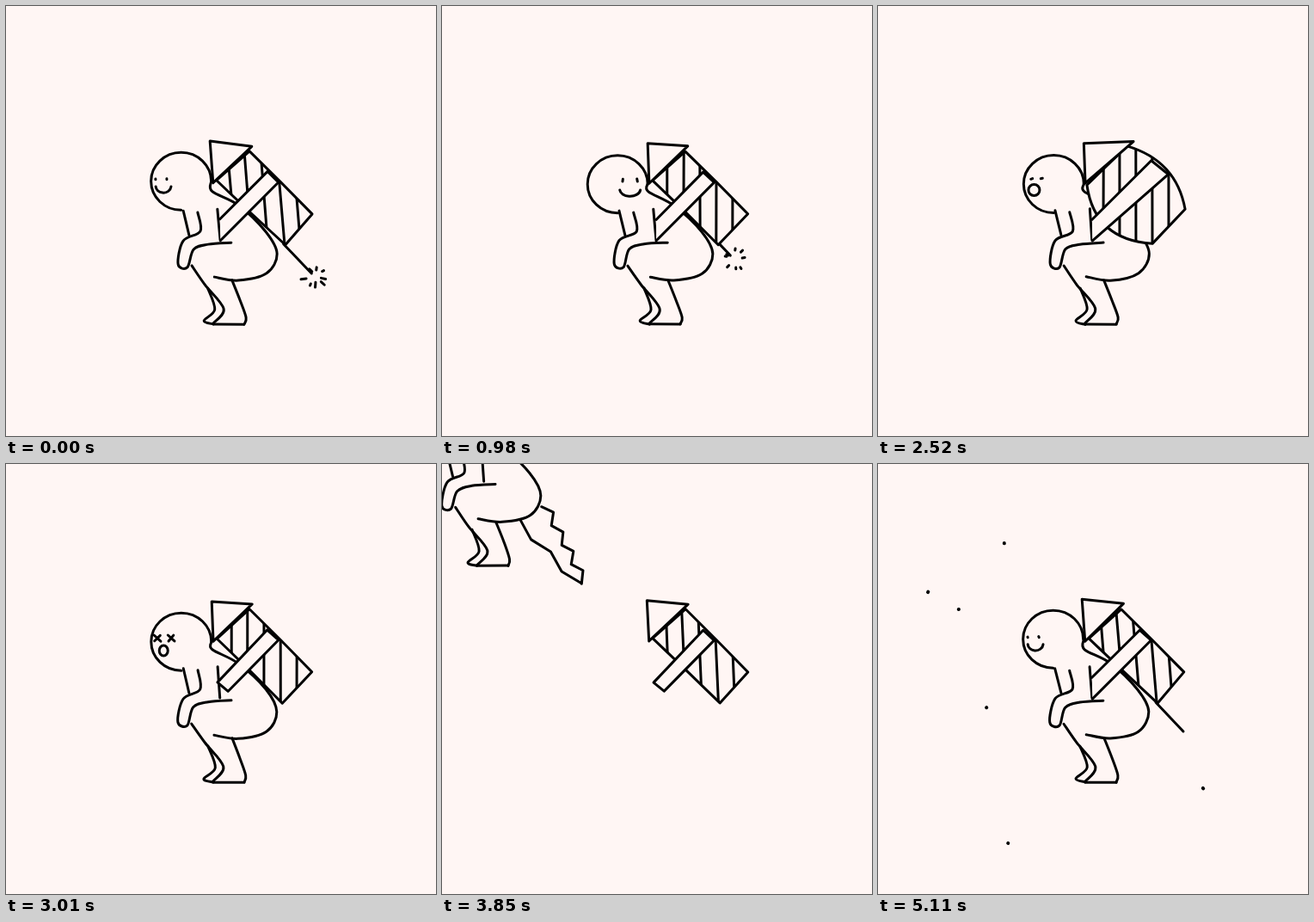
Animation, 500 px wide and 500 px high, one loop 5180 ms. Source, as an HTML page with a canvas:

```html
<!DOCTYPE html>
<html lang="en">
<head>
<meta charset="utf-8">
<title>Backpack rocket</title>
<style>
  html, body { margin: 0; height: 100%; overflow: hidden; background: #fff6f4; }
  canvas { display: block; width: 100vw; height: 100vh; }
</style>
</head>
<body>
<canvas id="stage" width="500" height="500"></canvas>
<script>
const ctx = document.getElementById('stage').getContext('2d');
const LOOP = 5180, STEP = 70, PAPER = '#fff6f4', INK = 3;
const BURNT = 1600, WORRY = 2310, PANIC = 2870, LAUNCH = 3010, GONE = 4200, RETURN = 4620;

const DEBRIS = [[147, 92], [58, 149], [94, 169], [126, 283], [151, 441], [378, 377]];
const BURST = [240, 265];

let frame, draws;

// Seeded wobble: a new value for each call, the same for each time step.
function wobble(size) {
  const v = Math.sin(frame * 12.9898 + draws++ * 78.233) * 43758.5453;
  return (v - Math.floor(v) - 0.5) * size;
}
const jitter = ([x, y], size = 0.7) => [x + wobble(size), y + wobble(size)];
const mix = (a, b, k) => a.map((v, i) => v + (b[i] - v) * k);
const polar = (x, y, r, angle) => [x + r * Math.cos(angle), y + r * Math.sin(angle)];

// Linear interpolation through [time, value] pairs.
function keyed(t, ...keys) {
  for (let i = 1; i < keys.length; i++) {
    const [t0, a] = keys[i - 1], [t1, b] = keys[i];
    if (t < t1) return a + (b - a) * Math.max(0, (t - t0) / (t1 - t0));
  }
  return keys[keys.length - 1][1];
}

function line(points, { closed = false, fill = false } = {}) {
  ctx.beginPath();
  points.forEach(p => ctx.lineTo(...jitter(p)));
  if (closed) ctx.closePath();
  if (fill) ctx.fill();
  ctx.stroke();
}

// Smooth line through all points.
function curve(...points) {
  const p = points.map(q => jitter(q));
  ctx.beginPath();
  ctx.moveTo(...p[0]);
  for (let i = 0; i < p.length - 1; i++) {
    const a = p[i - 1] || p[i], b = p[i], c = p[i + 1], d = p[i + 2] || c;
    ctx.bezierCurveTo(b[0] + (c[0] - a[0]) / 6, b[1] + (c[1] - a[1]) / 6,
      c[0] - (d[0] - b[0]) / 6, c[1] - (d[1] - b[1]) / 6, ...c);
  }
  ctx.stroke();
}

function arc(x, y, rx, ry, from = 0, to = 2 * Math.PI) {
  ctx.beginPath();
  ctx.ellipse(...jitter([x, y]), rx, ry, 0, from, to);
  ctx.stroke();
}

function drawFace(t) {
  if (t >= WORRY && t < PANIC) {
    for (const x of [179, 190]) line([[x - 1, 201], [x + 1, 200.5]]);
    arc(181.5, 214, 6.5, 6.5);
  } else if (t >= PANIC && t < RETURN) {
    for (const x of [176, 192]) {
      line([[x - 4, 199], [x + 4, 206]]);
      line([[x + 3, 199], [x - 3, 206]]);
    }
    arc(183, 217, 5, 6);
  } else {
    const turn = keyed(t, [420, 0], [700, 1], [1260, 1], [1540, 0]);
    const x = 183 + 36 * turn;
    for (const eye of [x - 9, x + 4 + 4 * turn]) line([[eye, 201], [eye, 202 + 2 * turn]]);
    arc(x, 209 + 4 * turn, 9 + 3 * turn, 8, 0.1, Math.PI - 0.1);
  }
}

// Jagged edge: evenly spaced points, alternately pushed out sideways.
function zigzag(from, to, teeth, size) {
  const angle = Math.atan2(to[1] - from[1], to[0] - from[0]) - Math.PI / 2;
  return Array.from({ length: teeth * 2 + 1 }, (_, i) =>
    polar(...mix(from, to, i / (teeth * 2)), i % 2 * size, angle));
}

function drawFlame() {
  const tip = jitter([360, 388], 6);
  line(zigzag([291, 316], tip, 2, -7));
  line(zigzag([316, 301], tip, 4, 9));
}

function drawPerson(t) {
  const flight = t >= LAUNCH && t < RETURN ? ((t - LAUNCH) / 420) ** 1.36 : 0;
  const headX = 204 - keyed(t, [980, 0], [1540, 3], [1900, 3], [2310, 0]);
  const headY = 204 + keyed(t, [0, 0], [560, 3], [4600, 3], [5000, 0]);
  ctx.save();
  ctx.translate(-78 * flight, -98 * flight);
  if (flight) drawFlame();
  arc(headX, headY, 35, 33.5, Math.PI / 2, 2 * Math.PI);
  curve([headX + 35, headY], [240, 216], [270, 232], [302, 262], [315, 288], [303, 311], [270, 319], [242, 315]);
  curve([206, 238], [213, 266]);
  curve([223, 240], [226, 262], [206, 273], [200, 300], [211, 304], [218, 283], [235, 277], [262, 275]);
  curve([246, 236], [249, 272]);
  curve([216, 302], [231, 324], [253, 352], [241, 369]);
  line([[241, 370], [277, 370]]);
  curve([277, 370], [279, 362], [272, 342], [263, 319]);
  curve([235, 328], [243, 353], [230, 366], [241, 370]);
  drawFace(t);
  ctx.restore();
}

function drawRocket(t, worn) {
  const bulge = keyed(t, [2240, 0], [2520, 1], [2730, 1.2], [2870, 0.8], [3010, 0]);
  const puff = keyed(t, [0, 0], [980, 1], [3500, 1], [4200, 0]);
  const blend = (plain, swollen) => jitter(mix(plain, swollen, bulge));

  const left = blend([245, 203], [243, 208]), top = blend([283, 169], [290, 163]);
  const right = blend([356, 242], [357, 236]), bottom = blend([325 - 4 * puff, 278], [319, 276]);
  ctx.beginPath();
  ctx.moveTo(...top);
  ctx.quadraticCurveTo(...blend([320, 205], [347, 180]), ...right);
  ctx.lineTo(...bottom);
  ctx.quadraticCurveTo(...blend([284, 240], [252, 272]), ...left);
  ctx.closePath();
  ctx.fill();
  ctx.stroke();

  ctx.save();
  ctx.clip();
  const slant = 5 * (1 - puff);
  for (let x = 262; x < 345; x += 19) line([[x - slant, 160], [x + slant, 280]]);
  ctx.restore();

  line([[237 + 2 * puff, 157 + 3 * puff], blend([286, 163], [297, 158]), [241, 206]],
    { closed: true, fill: true });

  const band = [blend([304, 193], [318, 180]), blend([317, 205], [338, 196])];
  if (worn) line([[249, 248], ...band, [249, 273]], { fill: true });
  else line([[246, 254], ...band, [258, 264]], { closed: true, fill: true });
}

function drawFuse(t) {
  const length = t >= RETURN ? 1 : 1 - t / BURNT;
  if (length <= 0) return;
  const [x, y] = mix([323, 277], [355, 311], length);
  line([[323, 277], [x, y]]);
  if (t >= RETURN) return;
  for (let i = 0; i < 8; i++) {
    const angle = i * Math.PI / 4 + wobble(0.6);
    const near = 9 + wobble(6), far = near + 1 + (3 + wobble(5)) * length;
    line([polar(x + 5, y + 4, near, angle), polar(x + 5, y + 4, far, angle)]);
  }
}

function drawDebris(t) {
  const age = (t - RETURN) / (LOOP - STEP - RETURN);
  const reach = 1 - (1 - age) ** 3;
  const tail = Math.max(0, reach - 0.2 * (1 - age));
  ctx.lineWidth = INK + 1;
  for (const end of DEBRIS) line([mix(BURST, end, tail), mix(BURST, end, reach)]);
}

function render(now) {
  frame = Math.floor((now % LOOP) / STEP);
  draws = 0;
  const t = frame * STEP;
  ctx.fillStyle = PAPER;
  ctx.fillRect(0, 0, 500, 500);
  ctx.lineWidth = INK;
  ctx.lineCap = ctx.lineJoin = 'round';
  if (t < GONE || t >= RETURN) drawPerson(t);
  drawRocket(t, t < LAUNCH || t >= RETURN);
  drawFuse(t);
  if (t >= RETURN) drawDebris(t);
}

const start = performance.now();
(function tick() {
  render(performance.now() - start);
  requestAnimationFrame(tick);
})();
</script>
</body>
</html>
```
